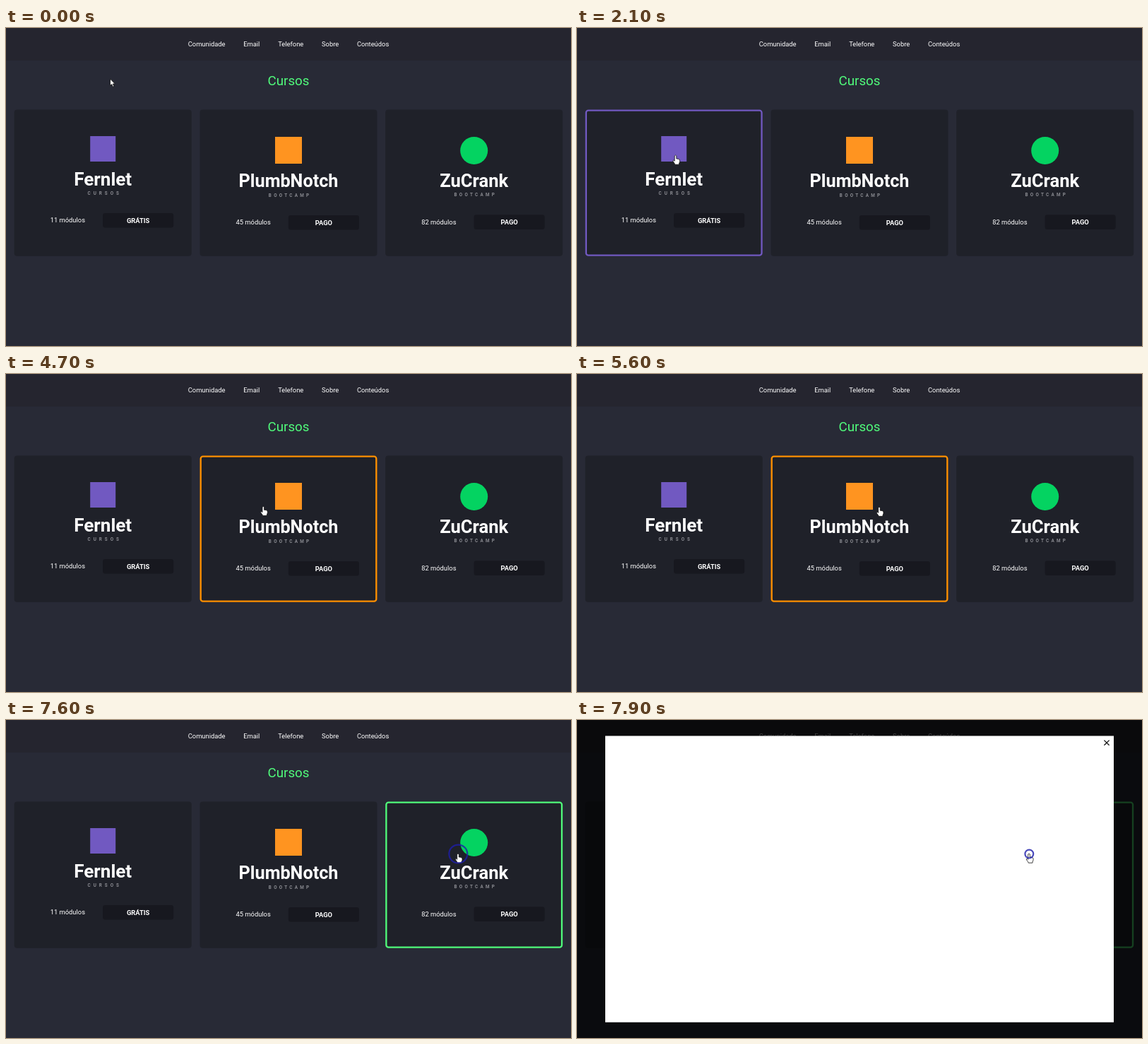
These frames come from a looping animation (800x450 px, 8 s). An HTML page with a canvas:

```html
<!DOCTYPE html>
<html lang="pt">
<head>
<meta charset="utf-8">
<title>Cursos</title>
<style>
  html, body { margin: 0; width: 100%; height: 100%; overflow: hidden; background: #282a36; }
  canvas { display: block; width: 800px; height: 450px; }
</style>
</head>
<body>
<canvas id="stage" width="800" height="450"></canvas>
<script>
const ctx = document.getElementById('stage').getContext('2d');
const LOOP = 8000, STEP = 100, FADE = 400;
const CLICK_AT = 7500, MODAL_AT = 7700;
const CARD = { y: 115.4, w: 251, h: 207.4 };

const nav = [['Comunidade', 257.7], ['Email', 336.2], ['Telefone', 385.2], ['Sobre', 447], ['Conteúdos', 497]];

// dy shifts the text block below the mark; from and to bound the hover
const cards = [
  { x: 11.7, name: 'Fernlet', size: 26, sub: 'CURSOS', gap: 4, modules: '11 módulos', price: 'GRÁTIS',
    dy: 0, color: '#7159c1', border: '#7159c1', from: 1590, to: 3910 },
  { x: 274.5, name: 'PlumbNotch', size: 25.2, sub: 'BOOTCAMP', gap: 3.3, modules: '45 módulos', price: 'PAGO',
    dy: 2.9, color: '#ff9420', border: '#ff9000', from: 4000, to: 6020 },
  { x: 537.2, name: 'ZuCrank', size: 25.6, sub: 'BOOTCAMP', gap: 3.3, modules: '82 módulos', price: 'PAGO',
    dy: 2.3, color: '#04d361', border: '#50fa7b', from: 6060, to: Infinity }
];

// Pointer rests at each place, then glides to the next
const home = [147.5, 72];
const moves = [
  { from: 1200, to: 2100, at: [139.5, 180] },
  { from: 2540, to: 5170, at: [385, 188] },
  { from: 5170, to: 6820, at: [640, 189] }
];

const arrow = new Path2D('M0 0V9.6L2.2 7.6L3.8 11.2L5.4 10.5L3.9 7H6.8Z');
const hand = new Path2D('M-1.3 1Q0-.8 1.3 1V5L4 5.3Q6 5.8 6 7.4V9.4Q5 11 4.9 13.2H-.8Q-1 11.6-3.4 9Q-4.3 7.4-2.7 7.1L-1.3 8.3Z');

const clamp = v => Math.min(1, Math.max(0, v));
const easeOut = p => 1 - (1 - clamp(p)) ** 2;
const glide = p => { p = clamp(p); return p * p * (3 - 2 * p); };

function text(str, x, y, size, { weight = 400, color = '#fff', align = 'left', gap = 0 } = {}) {
  ctx.font = `${weight} ${size}px Roboto, sans-serif`;
  ctx.fillStyle = color;
  ctx.textAlign = align;
  ctx.letterSpacing = gap + 'px';
  ctx.fillText(str, x + (align === 'center' ? gap / 2 : 0), y);
}

function box(x, y, w, h, r) {
  ctx.beginPath();
  ctx.roundRect(x, y, w, h, r);
}

function fillBox(color, x, y, w, h, r = 0) {
  ctx.fillStyle = color;
  box(x, y, w, h, r);
  ctx.fill();
}

function pointerAt(t) {
  return moves.reduce(([x, y], { from, to, at }) => {
    const k = glide((t - from) / (to - from));
    return [x + (at[0] - x) * k, y + (at[1] - y) * k];
  }, home);
}

function drawMark(i, cx, color) {
  if (i === 0) return fillBox(color, cx - 18, 153, 36, 36);
  if (i === 1) return fillBox(color, cx - 19, 154, 38, 38);
  ctx.fillStyle = color;
  ctx.beginPath();
  ctx.arc(cx, 173.5, 19.5, 0, Math.PI * 2);
  ctx.fill();
}

function drawCard(c, i, t) {
  const cx = c.x + CARD.w / 2, center = { align: 'center' };
  fillBox('#1f2129', c.x, CARD.y, CARD.w, CARD.h, 4);
  drawMark(i, cx, c.color);
  text(c.name, cx, 222.5 + c.dy, c.size, { ...center, weight: 700 });
  text(c.sub, cx + .5, 236 + c.dy, 6.3, { ...center, weight: 700, color: '#8b8c92', gap: c.gap });
  text(c.modules, c.x + 51, 275.4 + c.dy, 9.37);
  fillBox('#17181f', c.x + 125.4, 262 + c.dy, 100, 20.6, 3);
  text(c.price, c.x + 175.4, 275.6 + c.dy, 9.37, { ...center, weight: 700 });

  const glow = easeOut((t - c.from) / FADE) - easeOut((t - c.to) / FADE);
  if (glow <= 0) return;
  ctx.globalAlpha = glow;
  ctx.strokeStyle = c.border;
  ctx.lineWidth = 2.34;
  box(c.x + 1.17, CARD.y + 1.17, CARD.w - 2.34, CARD.h - 2.34, 3.2);
  ctx.stroke();
  ctx.globalAlpha = 1;
}

function drawModal() {
  fillBox('rgba(0,0,0,.74)', 0, 0, 800, 450);
  fillBox('#fff', 40, 22.4, 720, 405.4);
  ctx.strokeStyle = '#111';
  ctx.lineWidth = 1.3;
  ctx.beginPath();
  ctx.moveTo(746.4, 28.6); ctx.lineTo(753.6, 35.8);
  ctx.moveTo(753.6, 28.6); ctx.lineTo(746.4, 35.8);
  ctx.stroke();
}

function drawPointer(t) {
  const [x, y] = pointerAt(t);
  const shape = y > CARD.y ? hand : arrow;
  ctx.save();
  ctx.translate(x, y);
  ctx.fillStyle = '#fff';
  ctx.strokeStyle = '#111';
  ctx.lineWidth = .8;
  ctx.fill(shape);
  ctx.stroke(shape);
  if (t >= CLICK_AT) {
    ctx.strokeStyle = 'rgba(30,30,170,.8)';
    ctx.lineWidth = 2.2;
    ctx.beginPath();
    ctx.arc(.3, .5, 15.3 - (t - CLICK_AT) * .0235, 0, Math.PI * 2);
    ctx.stroke();
  }
  ctx.restore();
}

function draw(t) {
  fillBox('#282a36', 0, 0, 800, 450);
  fillBox('#25252f', 0, 0, 800, 46);
  nav.forEach(([label, x]) => text(label, x, 26.4, 9.37));
  text('Cursos', 400, 81.2, 18.74, { color: '#50fa7b', align: 'center' });
  cards.forEach((c, i) => drawCard(c, i, t));
  if (t >= MODAL_AT) drawModal();
  drawPointer(t);
}

const start = performance.now();
function tick() {
  const t = (performance.now() - start) % LOOP;
  draw(Math.floor(t / STEP) * STEP);
  requestAnimationFrame(tick);
}
tick();
</script>
</body>
</html>
```
